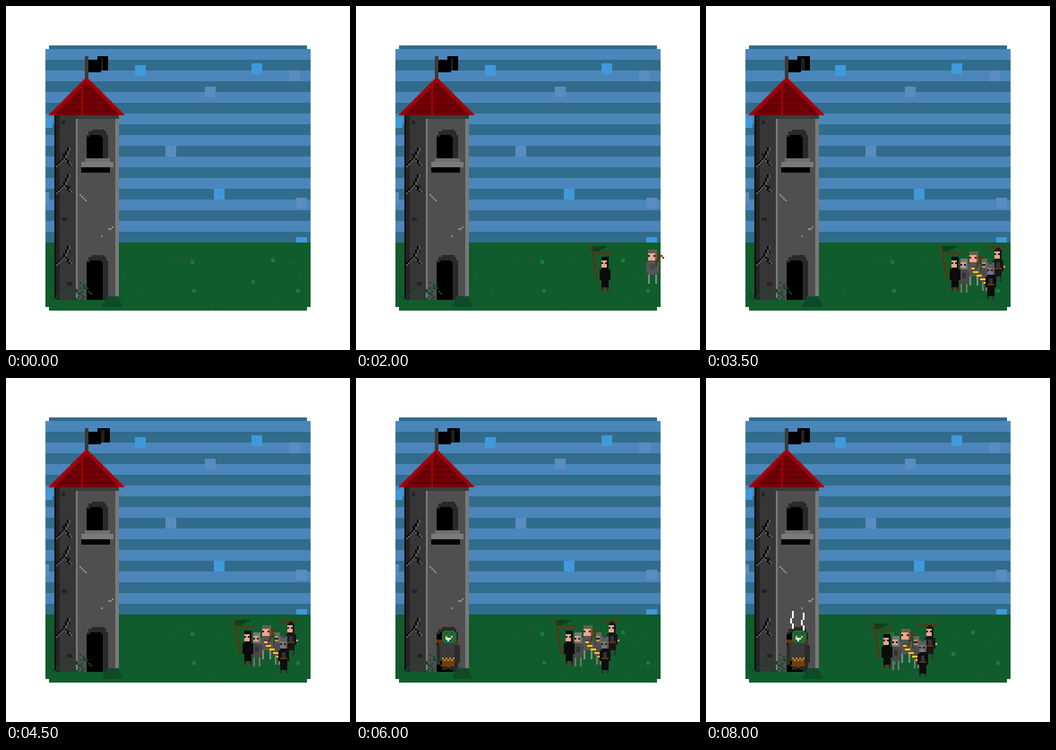
An HTML page with a canvas that plays this animation: 576 by 576 pixels, repeating every 8500 ms.

```html
<!DOCTYPE html>
<html>
<head>
<meta charset="utf-8">
<style>
html, body { margin: 0; width: 100%; height: 100%; overflow: hidden; background: #fff; }
canvas { display: block; }
</style>
</head>
<body>
<canvas id="stage" width="576" height="576"></canvas>
<script>
const ctx = document.getElementById('stage').getContext('2d');
const CELL = 3, STEP = 500, STEPS = 17;
const WOOD = '#63300c', SKIN = '#efa78c';
let ox = 0, oy = 0;

// Coordinates are in cells of 3 px, relative to the current origin.
function box(color, x, y, w = 1, h = 1) {
  ctx.fillStyle = color;
  ctx.fillRect((ox + x) * CELL, (oy + y) * CELL, w * CELL, h * CELL);
}

function line(color, x0, y0, x1, y1) {
  const n = Math.max(Math.abs(x1 - x0), Math.abs(y1 - y0), 1);
  for (let i = 0; i <= n; i++) {
    box(color, Math.round(x0 + (x1 - x0) * i / n), Math.round(y0 + (y1 - y0) * i / n));
  }
}

function at(x, y, draw) {
  ox = x; oy = y;
  draw();
  ox = oy = 0;
}

function seeded(seed) {
  return () => (seed = (seed * 16807) % 2147483647) / 2147483647;
}

// Linear value through a few [time, value] keys.
function between(keys, t) {
  for (let i = 1; i < keys.length; i++) {
    const [t0, v0] = keys[i - 1], [t1, v1] = keys[i];
    if (t <= t1) return Math.round(v0 + (v1 - v0) * (t - t0) / (t1 - t0));
  }
}

function sky() {
  box('#4b86bb', 22, 24, 148, 108);
  box('#326c8c', 24, 22, 144, 2);
  for (let y = 30; y < 132; y += 12) box('#326c8c', 22, y, 148, 6);
  ctx.save();
  ctx.beginPath();
  ctx.rect(22 * CELL, 22 * CELL, 148 * CELL, 110 * CELL);
  ctx.clip();
  for (const [x, y] of [[72, 33], [137, 32], [116, 102], [162, 129], [20, 62]]) box('#3f99db', x, y, 6, 6);
  for (const [x, y] of [[111, 45], [158, 36], [89, 78], [162, 107], [18, 104]]) box('#5b8cbf', x, y, 6, 6);
  ctx.restore();
}

function ground() {
  const random = seeded(42);
  box('#115c2c', 22, 132, 148, 36);
  box('#115c2c', 24, 168, 144, 2);
  for (let i = 0; i < 8; i++) {
    box('#1b6030', Math.floor(66 + random() * 100), Math.floor(135 + random() * 30));
  }
  for (const [x, y] of [[103, 142], [148, 141], [137, 153], [104, 158], [162, 158]]) box('#1c7a3e', x, y, 2, 2);
  for (const [x, y] of [[96, 140], [150, 165], [24, 138], [114, 167], [159, 143]]) box('#36502f', x, y, 2, 1);
}

function arch(y, bottom) {
  box('#292929', 48, y, 7);
  box('#292929', 46, y + 1, 10, 2);
  box('#292929', 45, y + 3, 12, bottom - y - 3);
  box('#000', 47, y + 3, 6);
  box('#000', 45, y + 4, 9, bottom - y - 4);
}

function crack(y) {
  for (const [color, shift] of [['#575757', 1], ['#000', 0]]) {
    line(color, 34 + shift, y, 31 + shift, y + 6);
    line(color, 31 + shift, y + 6, 28, y + 9 + shift);
    line(color, 32, y + 5 + shift, 35 + shift, y + 9);
  }
}

function roof() {
  for (let i = 0; i <= 20; i++) {
    const left = 44 - i, width = 2 + 2 * i;
    box('#a10008', left, 40 + i, width);
    if (i > 2) box(i % 3 ? '#720006' : '#5f0005', left + 3, 40 + i, width - 6);
  }
  box('#a10008', 42, 44, 1, 17);
  box('#3b3b3b', 44, 28, 2, 12);
}

function tower() {
  const random = seeded(9);
  box('#363636', 27, 61, 12, 103);
  box('#242424', 28, 61, 2, 103);
  box('#101010', 27, 61, 1, 103);
  for (let i = 0; i < 6; i++) {
    box('#242424', 31 + Math.floor(random() * 4), 64 + i * 18, 2 + i % 2, 2);
  }
  box('#4f4f4f', 40, 63, 21, 101);
  box('#3b3b3b', 39, 61, 24, 2);
  box('#7a7a7a', 39, 63, 1, 101);
  box('#7a7a7a', 61, 63, 2, 100);
  [79, 94, 134].forEach(crack);
  line('#8a8a8a', 41, 105, 44, 108);
  line('#8a8a8a', 57, 124, 59, 123);
  box('#8a8a8a', 53, 128);

  arch(69, 85);
  box('#6f6f6f', 44, 85, 14, 2);
  box('#7a7a7a', 42, 87, 18, 3);
  box('#000', 42, 90, 16, 3);
  arch(139, 164);
  roof();
}

function flag(wide) {
  const fold = wide ? 2 : 1;
  box('#000', 46, 30, 7, 7);
  box('#000', 51, 28, 5 + fold, 8);
  box('#202020', 53, 29, fold, 7);
}

function plants() {
  for (let i = 0; i < 24; i++) {
    box('#0d4a26', 24 + i, Math.round(160 + 3 * Math.sin(i * .55)));
    if (i < 10) box('#0d4a26', Math.round(41 + 2 * Math.sin(i)), 154 + i);
  }
  for (let i = 0; i < 3; i++) box('#0e4a28', 56 - i, 162 + 2 * i, 7 + 2 * i, 2);
}

function troll(grin) {
  box('#3a3a3a', 46, 147, 11, 11);
  box('#2b2b2b', 45, 149, 2, 11);
  box('#2b2b2b', 55, 149, 3, 10);
  for (const x of [45, 54]) box(WOOD, x, 146, 3, 2);
  box('#1f6b3a', 49, 141, 6, 7);
  box('#1f6b3a', 48, 142, 8, 5);
  for (const x of [50, 53]) {
    box('#174f2c', x, 142);
    box('#e0c030', x, 144);
  }
  box('#fff', 50, 145, grin ? 3 : 1);
  box('#fff', 51, 146);
  box('#70400c', 48, 157, 7, 5);
  for (let i = 0; i < 7; i++) box('#c28a12', 48 + i, 156 + i % 2);
  for (const x of [48, 52]) box('#262626', x, 161, 3, 2);
}

function distance(px, py, [x0, y0], [x1, y1]) {
  const dx = x1 - x0, dy = y1 - y0;
  const t = Math.min(1, Math.max(0, ((px - x0) * dx + (py - y0) * dy) / (dx * dx + dy * dy)));
  return Math.hypot(px - x0 - t * dx, py - y0 - t * dy);
}

function questionMark(outlined) {
  const path = [[43.8, 126], [44.5, 121.5], [49.5, 118.5], [55, 121.5], [54.5, 127], [50.8, 132]];
  for (let y = 114; y < 136; y++) {
    for (let x = 39; x < 61; x++) {
      const d = Math.min(...path.slice(1).map((p, i) => distance(x + .5, y + .5, path[i], p)));
      if (d < 2.7) box('#266099', x, y);
      else if (d < 3.7 && outlined) box('#215486', x, y);
    }
  }
  if (outlined) box('#215486', 48, 135, 6, 6);
  box('#266099', 49, 135, 4, 6);
}

function anger(flip) {
  for (const [x, y] of [[47, 130], [53, 131]]) {
    for (let i = 0; i < 10; i++) {
      const middle = i > 3 && i < 7;
      box('#fff', x + (middle !== flip), y + i);
    }
  }
}

// A figure is a six-cell head, a coat with two sleeves, and two legs.
function figure({ w = 6, hair, skin = SKIN, coat, trim = coat, beard = skin, length, legs, legLength }) {
  const core = w - 2, foot = 6 + length;
  box(hair, 1, 0, core, 6);
  box(skin, 1, 2, core - 1, 4);
  box('#222', 1, 3);
  box('#222', core - 1, 3);
  box(beard, 1, 5, core - 1);
  box(coat, 1, 6, core, length);
  box(trim, 2, 8, core - 2, 3);
  for (const x of [0, w - 1]) box(coat, x, 7, 1, 6);
  for (const x of [1, core]) box(legs, x, foot, 1, legLength);
}

function twigs(x, y, n) {
  for (let i = 0; i < n; i++) box(WOOD, x + i, y + (i % 3 === 1 ? 1 : 0));
}

function scythe() {
  line(WOOD, -5, -6, -2, 12);
  twigs(-2, -3, 9);
  for (let i = 0; i < 3; i++) box('#0d4022', -4, i - 6, 8 - 2 * i);
}

function fork() {
  twigs(-3, -1, 10);
  box(SKIN, 6, 10);
  box(WOOD, 1, 11, 4);
}

function bow() {
  line(WOOD, 6, 2, 9, 4);
  line(WOOD, 6, 3, 5, 8);
}

function sash() {
  for (let i = 0; i < 8; i++) {
    box('#c31912', i - 4, 6 + i);
    box('#e8d51c', i - 5, 5 + i + i % 2, 2);
  }
}

function helmet() {
  for (const x of [1, 4]) box('#5c5c5c', x, -1);
  box(WOOD, 1, 11, 4);
}

// Place in the crowd, the step of arrival, and the look; listed back to front.
const people = [
  { x: 160, y: 135, enter: 6, prop: fork,
    look: { hair: '#171717', coat: '#171717', trim: '#353535', length: 10, legs: '#303030', legLength: 3 } },
  { x: 146, y: 137, enter: 4, prop: bow,
    look: { w: 7, hair: '#665c50', coat: '#555', trim: '#484848', length: 8, legs: '#878787', legLength: 5 } },
  { x: 153, y: 141, enter: 6, prop: sash,
    look: { w: 5, hair: '#666', skin: '#c58a70', beard: '#7b4a2c', coat: '#4c4c4c', length: 7, legs: '#777', legLength: 5 } },
  { x: 141, y: 141, enter: 5,
    look: { hair: '#777', skin: '#d9a08c', beard: '#777', coat: '#484848', trim: '#333', length: 8, legs: '#717171', legLength: 5 } },
  { x: 136, y: 140, enter: 2, prop: scythe,
    look: { hair: '#0b0b0b', coat: '#0b0b0b', length: 11, legs: '#740808', legLength: 2 } },
  { x: 156, y: 144, enter: 7, prop: helmet,
    look: { hair: '#5c5c5c', skin: '#777', coat: '#0d0d0d', trim: '#333', length: 12, legs: '#303030', legLength: 2 } }
];
const GATHERED = 7;
const advance = [[7, 0], [9, -4], [11, -12], [13, -29], [14, -34], [16, -38]];
const sway = [[7, 0], [9, 1], [11, 2], [14, 0], [16, 3]];

function crowd(step) {
  for (const { x, y, enter, prop, look } of people) {
    if (step < enter) continue;
    let dx, dy;
    if (step < GATHERED) {
      dx = Math.min(10 * Math.max(0, Math.min(enter + 2, GATHERED) - step), Math.max(0, 162 - x));
      dy = (step + enter / 2) % 2 === 1 ? 0 : -1;
      if (enter === 2) dx = 10 * Math.max(0, 4 - step);
    } else {
      dx = between(advance, step);
      dy = between(sway, step);
    }
    at(x + dx, y + dy, () => {
      figure(look);
      if (prop) prop();
    });
  }
}

function render(now) {
  const step = Math.floor(now / STEP) % STEPS;
  ctx.fillStyle = '#fff';
  ctx.fillRect(0, 0, 576, 576);
  sky();
  ground();
  tower();
  flag(step > GATHERED || step % 2 === 1);
  if (step >= 10) troll(step !== 14);
  if (step === 10 || step === 11) questionMark(step === 11);
  if (step >= 13) anger(step % 2 === 0);
  plants();
  crowd(step);
}

let start;
function tick(now) {
  start ??= now;
  render(Math.max(0, now - start));
  requestAnimationFrame(tick);
}
render(0);
requestAnimationFrame(tick);
</script>
</body>
</html>
```
